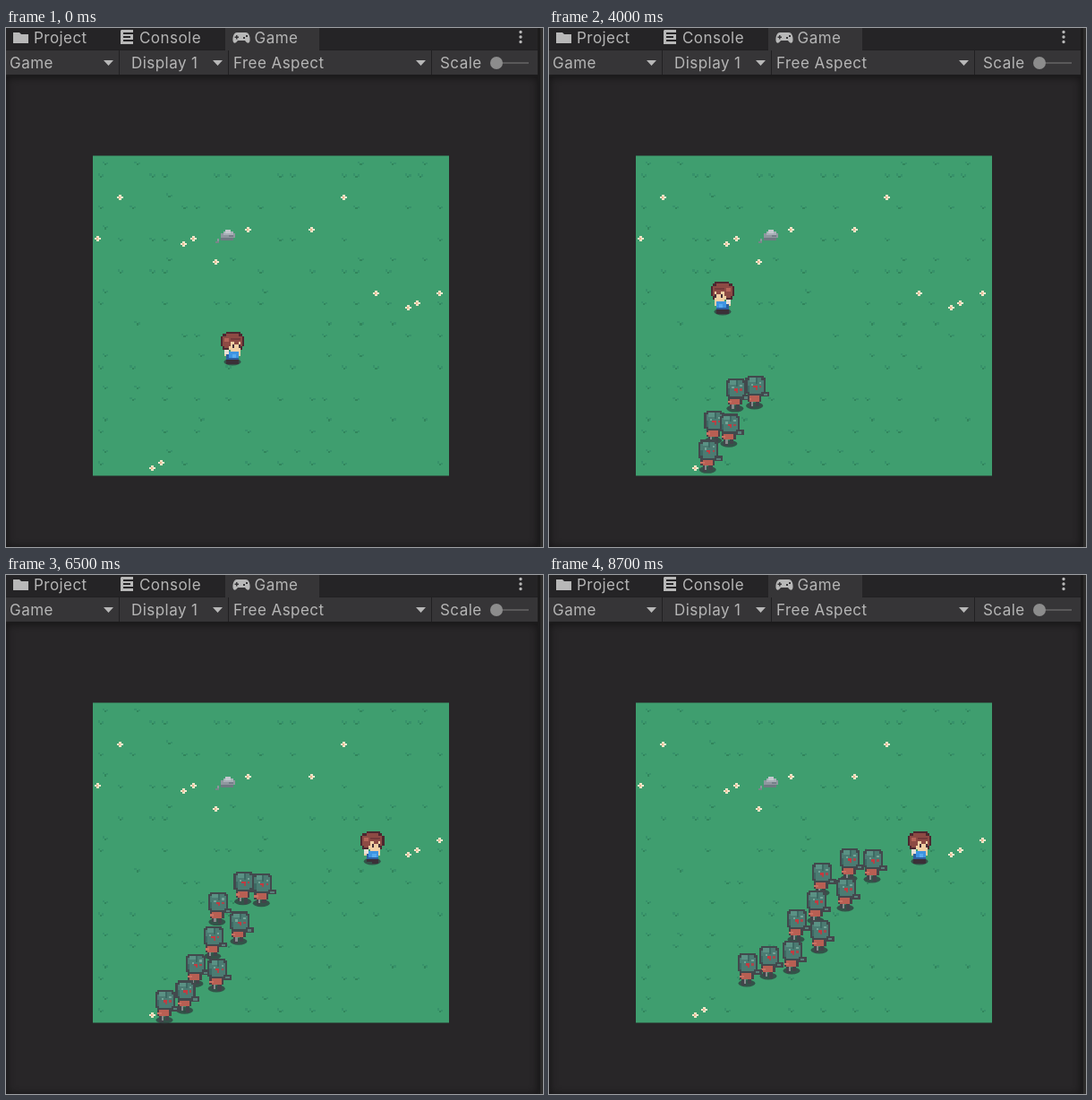
These frames come from a looping animation (600x579 px, 8800 ms). An HTML page with a canvas:

```html
<!DOCTYPE html>
<html lang="en">
<head>
<meta charset="utf-8">
<title>Game view</title>
<style>
  html, body { margin: 0; width: 100%; height: 100%; overflow: hidden; background: #282628; }
  svg, canvas, .view { position: absolute; left: 0; top: 0; }
  .view { top: 53px; width: 595px; height: 526px; background: #282628; box-shadow: inset 0 1px 8px 1px #151415; }
  text { font: 17px Inter, Roboto, sans-serif; letter-spacing: .45px; fill: #b5b5b5; }
</style>
</head>
<body>
<div class="view"></div>
<svg width="600" height="579" viewBox="0 0 600 579">
  <path fill="#252426" d="M0 0H600V25H0Z"/>
  <path fill="#363537" d="M245 0H350V25H595V53H0V25H245Z"/>
  <path stroke="#212022" d="M0 24.5H245M350 24.5H595M126.5 25V53M248.5 25V53M475.5 25V53"/>
  <path fill="#1c1b1c" d="M0 52H595V54H0ZM594 0H597V579H594Z"/>
  <path fill="#2d2c2b" d="M597 0H600V579H597Z"/>
  <g fill="#b8b8b8">
    <path d="M8 5H15L17 7H25V17H8Z"/>
    <path fill-rule="evenodd" d="M129 2H142V18H128V3ZM131 5V7H142V5ZM131 9V11H139V9ZM131 13V15H142V13Z"/>
    <path fill-rule="evenodd" d="M258 5H268C271 5 273 9 272.5 14C272 18 269 17 267 14H259C257 17 254 18 253.5 14C253 9 255 5 258 5ZM257 8V9.5H255.5V11H257V12.5H258.5V11H260V9.5H258.5V8ZM265 10V12H267V10ZM268 8V10H270V8Z"/>
    <path d="M109 36H120L114.5 42ZM231 36H242L236.5 42ZM458 36H469L463.5 42Z"/>
  </g>
  <path stroke="#b8b8b8" stroke-width="3.4" stroke-linecap="round" stroke-dasharray="0 5.5" d="M575 4.5V16"/>
  <path stroke="#5a595a" stroke-width="2" d="M550 39H584"/>
  <circle cx="548" cy="39" r="7" fill="#8c8c8c"/>
  <text x="31" y="17">Project</text>
  <text x="149" y="17">Console</text>
  <text x="277.5" y="17">Game</text>
  <text x="4" y="45">Game</text>
  <text x="140" y="45">Display 1</text>
  <text x="254" y="45">Free Aspect</text>
  <text x="485" y="45">Scale</text>
</svg>
<canvas id="stage" width="600" height="579"></canvas>
<script>
const ctx = document.getElementById('stage').getContext('2d');
const UNIT = 2.23, TILE = 16 * UNIT, LOOP = 8800, STEP = 100;

// Returns a function that fills art-pixel rectangles around (cx, cy), optionally mirrored.
function brush(cx, cy, flip = false) {
  return (color, x, y, w, h) => {
    if (flip) x = -x - w;
    const left = Math.round(cx + x * UNIT), top = Math.round(cy + y * UNIT);
    ctx.fillStyle = color;
    ctx.fillRect(left, top, Math.round(cx + (x + w) * UNIT) - left, Math.round(cy + (y + h) * UNIT) - top);
  };
}

function seededRandom(seed) {
  return () => (seed = seed * 16807 % 2147483647) / 2147483647;
}

const flowers = [[127, 189], [377, 189], [102, 235], [198, 241], [209, 235], [270, 225], [341, 225],
                 [234, 261], [413, 296], [449, 312], [459, 307], [484, 296], [163, 491], [173, 485]];

function drawTuft(x, y) {
  const p = brush(x, y);
  p('#37916a', -1, -1, 1, 1);
  p('#31855c', 0, 0, 1, 1);
  p('#37916a', 1, -.5, 1, 1);
}

function drawRock(x, y) {
  const p = brush(x, y);
  p('#6f7982', -3, 1, 6, 1.5);
  p('#8f979f', -3, -1, 7, 2.5);
  p('#a9b0b8', -2, -2, 5, 2);
  p('#c3c8ce', -1, -2.5, 3, 1.5);
  p('#747f88', 1, 0, 2, 1);
  p('#788488', -6, 3, 2, 1);
  p('#8c969d', -5, 2, 1, 1);
}

function drawField() {
  ctx.fillStyle = '#3f9e6f';
  ctx.fillRect(97, 142.5, 398, 357);
  // Every tile has room for a tuft near its top and a second one lower, left or right.
  const random = seededRandom(77);
  for (let row = 0; row < 10; row++) for (let col = 0; col < 11; col++) {
    const x = col * TILE, y = row * TILE;
    if (random() < .4) drawTuft(110 + x, 151 + y);
    if (random() < .75) drawTuft((random() < .5 ? 105 : 127) + x, 164.5 + y);
  }
  for (const [fx, fy] of flowers) {
    const p = brush(fx, fy);
    p('#eee3c6', -.5, -1.5, 1.5, 3);
    p('#f5ead0', -1.5, -.5, 3.5, 1);
    p('#e8b58d', -.5, -.5, 1, 1);
  }
  drawRock(247, 231);
}

function drawShadow(x, y) {
  ctx.fillStyle = 'rgba(48,58,60,.75)';
  ctx.beginPath();
  ctx.ellipse(x, y + 15.5, 9.5, 4, 0, 0, 7);
  ctx.fill();
}

function drawPlayer(x, y, left, stride) {
  drawShadow(x, y);
  const p = brush(x, y, left);
  p('#3b3038', -3, 5, 3, stride === 1 ? 2 : 3);
  p('#3b3038', 0, 5, 3, stride === 2 ? 2 : 3);
  // Shirt and hands
  p('#2d5f9f', -3, 2, 6, 4);
  p('#3e94e2', -2, 2, 5, 3);
  p('#57aaf0', 0, 3, 2, 2);
  p('#e9e0d6', -4, 1, 2, 2);
  p('#f3cfa4', -4, 3, 1, 1);
  p('#f3cfa4', 3, 2, 1, 2);
  // Hair and its outline
  p('#4c2830', -3, -8, 7, 1);
  p('#4c2830', -5, -7, 10, 8);
  p('#4c2830', -6, -6, 12, 5);
  p('#8d4a44', -3, -7, 6, 1);
  p('#8d4a44', -5, -6, 10, 5);
  p('#8d4a44', -4, -1, 2, 1);
  p('#b56458', -4, -5, 2, 2);
  p('#74393a', -1, -5, 5, 1);
  // Face
  p('#f3cfa4', -1, -3, 5, 5);
  p('#f3cfa4', -2, -1, 1, 2);
  p('#8d4a44', 1, -4, 2, 2);
  p('#45303a', 0, -2, 1, 2);
  p('#45303a', 3, -2, 1, 2);
}

function drawZombie(x, y, stride) {
  drawShadow(x - 1, y);
  const p = brush(x, y);
  p('#42444a', -3, 5, 2, stride ? 2 : 3);
  p('#42444a', 0, 5, 2, stride ? 3 : 2);
  p('#85888a', -2, 5, 1, 2);
  // Body and reaching arm
  p('#4a4146', -4, 1, 7, 4);
  p('#b85f53', -3, 2, 5, 3);
  p('#c97062', -4, 3, 2, 1);
  p('#44474c', 2, 0, 5, 2.5);
  p('#a9574e', 1, 1, 3, 1);
  p('#587f79', 4, 1, 2, 1);
  // Head
  p('#42494d', -4, -8, 8, 10);
  p('#42494d', -5, -7, 10, 8);
  p('#4b7b72', -3, -7, 6, 8);
  p('#4b7b72', -4, -6, 8, 6);
  p('#5a9184', -3, -7, 3, 2);
  p('#3d6963', 0, -7, 1, 3);
  p('#3d6963', -4, -3, 1, 3);
  p('#73a396', -2, -4, 1, 1);
  p('#73a396', 2, -5, 1, 1);
  p('#c43a40', -1, -3, 2, 1);
  p('#a8474b', 0, -2, 1, 1);
  p('#a8474b', 2, -3, 1, 1);
}

// The player's walk as [time, x, y] waypoints.
const route = [[100, 253, 357], [820, 321, 357], [2600, 321, 357], [3150, 270, 357],
               [4000, 194, 301], [4550, 231, 338], [5400, 318, 338], [5900, 352, 304], [6550, 414, 304]];

function playerAt(t) {
  let i = 1;
  while (i < route.length - 1 && route[i][0] < t) i++;
  const [t0, x0, y0] = route[i - 1], [t1, x1, y1] = route[i];
  const k = Math.min(1, Math.max(0, (t - t0) / (t1 - t0)));
  return { x: x0 + (x1 - x0) * k, y: y0 + (y1 - y0) * k, moving: k > 0 && k < 1 && x0 !== x1, left: t >= 2600 && t <= 4000 };
}

// Zombies chase the player at constant speed. Each chase is traced back from where it ends,
// then bent so that it begins at the common spawn point.
const spawn = { x: 178, y: 481 }, SPEED = TILE * STEP / 1000;
const chaseEnds = [[362, 324], [336, 323], [332, 356], [305, 339], [299, 370],
                   [303, 403], [277, 391], [272, 426], [246, 432], [222, 440]];

function traceChase([x, y], index) {
  const last = LOOP / STEP - 1, first = Math.ceil((1200 + 660 * index) / STEP);
  const path = [];
  for (let step = last; step >= first; step--) {
    path[step] = { x, y };
    const goal = playerAt(step * STEP), distance = Math.hypot(goal.x - x, goal.y - y);
    x -= (goal.x - x) / distance * SPEED;
    y -= (goal.y - y) / distance * SPEED;
  }
  const dx = spawn.x - path[first].x, dy = spawn.y - path[first].y;
  for (let step = first; step <= last; step++) {
    const bend = ((last - step) / (last - first)) ** 2;
    path[step].x += dx * bend;
    path[step].y += dy * bend;
  }
  return path;
}
const chases = chaseEnds.map(traceChase);

function render(now) {
  const step = Math.floor(now % LOOP / STEP), stride = Math.floor(step / 2);
  ctx.clearRect(0, 0, 600, 579);
  drawField();
  const { x, y, moving, left } = playerAt(step * STEP);
  const actors = [{ y, draw: () => drawPlayer(x, y, left, moving ? 1 + stride % 2 : 0) }];
  chases.forEach((path, i) => {
    const spot = path[step];
    if (spot) actors.push({ y: spot.y, draw: () => drawZombie(spot.x, spot.y, (stride + i) % 2) });
  });
  actors.sort((a, b) => a.y - b.y).forEach(actor => actor.draw());
}

const start = performance.now();
function tick() {
  render(performance.now() - start);
  requestAnimationFrame(tick);
}
tick();
</script>
</body>
</html>
```
